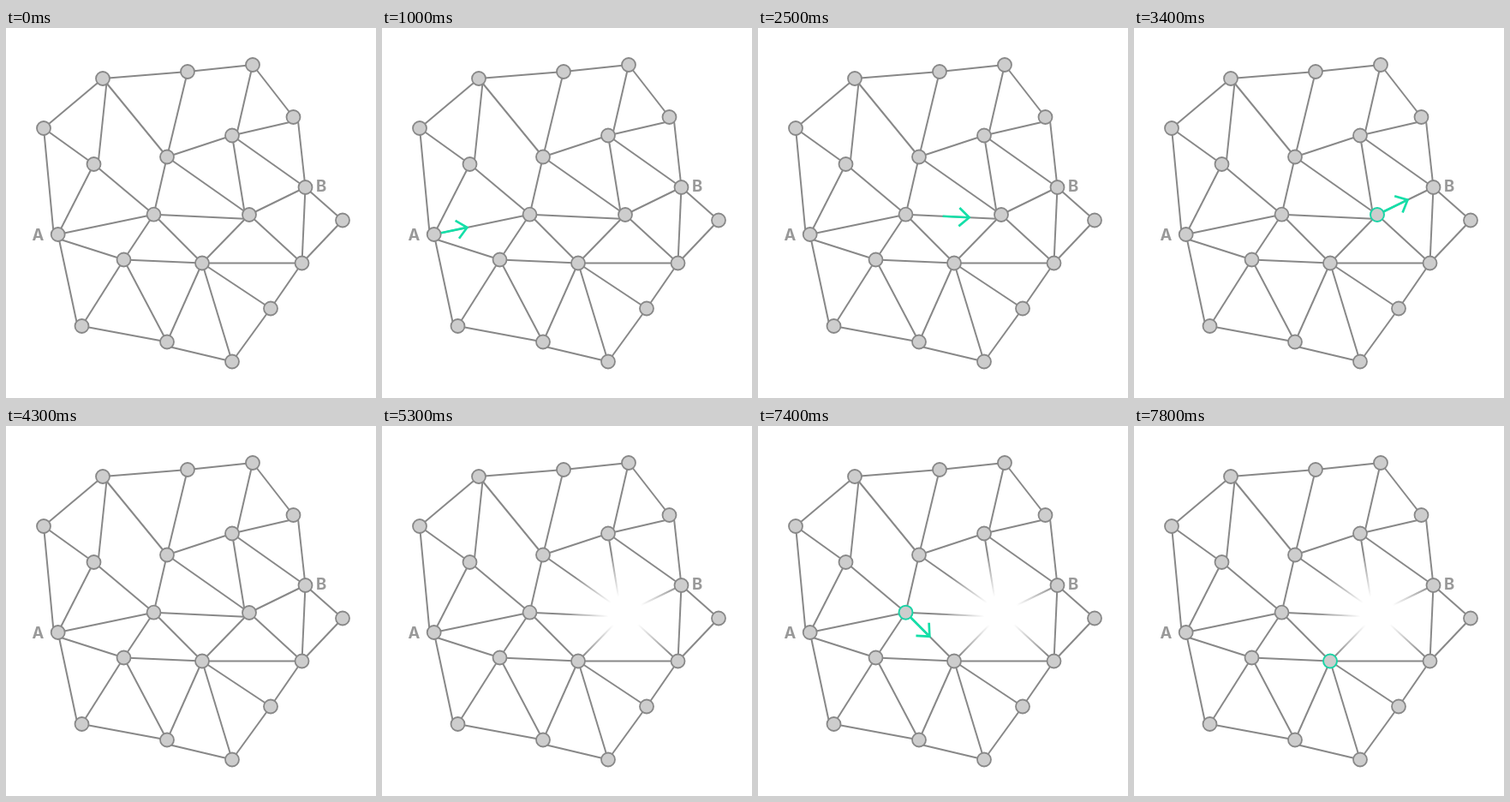
Write an HTML page with a canvas that moves like this. It is 432x432 px and loops after 8000 ms.

```html
<!DOCTYPE html>
<html lang="en">
<head>
<meta charset="utf-8">
<title>Network route</title>
<style>
html, body { margin: 0; width: 100%; height: 100%; overflow: hidden; background: #fff; }
canvas { display: block; width: 432px; height: 432px; }
</style>
</head>
<body>
<canvas id="stage"></canvas>
<script>
const LOOP = 8000, LOST_AT = 5300, LOST = 12;
const HOLD = 500, STEP = 200;
const GREY = '#888', FILL = '#cdcdcd', GREEN = '#14dfa8', RING = '#1dd3a6';

const nodes = `44,117 113,59 212,51 288,43 335.5,104 102.5,159 188,150.5 264,125.5 349.5,186
  393,224.5 60.7,241 172.5,217.7 284,218 137.5,270.5 229,274.5 345.5,274.5 309,327.5
  88.5,348 188,366.5 264,389.5`.split(/\s+/).map(p => p.split(',').map(Number));

// A letter after a node number attaches the line off centre: left, right or down
const sides = { '': [0, 0], l: [-5, 0], r: [5, 0], d: [0, 5] };
const edges = `0-1 1-2 2-3 3-4 4r-8 8-9 9-15 8-15 15-16 16-19 18d-19 17-18 10-17l 0-10l 0-5
  1r-5r 5-10 5-11 1-6 2-6 6-11 6-7 3-7r 4d-7 7-8 7-12l 6-12 10-11 11-12d 12-8 12-14 12-15
  11-13 11-14 10d-13 13-14 14-15 13-17 13-18 14-18 14-19 14-16`.split(/\s+/).map(readEdge);

// Each hop lights a node, then an arrow walks to the next one
const hops = [
  { at: 500, from: 10, to: 11, arrows: 4 },
  { at: 1800, from: 11, to: 12, arrows: 3, glow: true },
  { at: 2900, from: 12, to: 8, arrows: 2, glow: true },
  { at: 3800, from: 8, arrows: 0 },
  { at: 5800, from: 10, to: 11, arrows: 3, glow: true },
  { at: 6900, from: 11, to: 14, arrows: 2, glow: true },
  { at: 7800, from: 14, arrows: 0 }
];

const canvas = document.getElementById('stage');
const ctx = canvas.getContext('2d');
const scale = window.devicePixelRatio || 1;
canvas.width = canvas.height = 432 * scale;
ctx.scale(scale, scale);

const fade = ctx.createRadialGradient(...nodes[LOST], 20, ...nodes[LOST], 72);
fade.addColorStop(0, 'rgba(136,136,136,0)');
fade.addColorStop(1, 'rgba(136,136,136,1)');

function readEdge(text) {
  const [a, b] = text.split('-').map(end => {
    const id = parseInt(end), [dx, dy] = sides[end.replace(/\d+/, '')];
    return { id, point: [nodes[id][0] + dx, nodes[id][1] + dy] };
  });
  return { a: a.id, b: b.id, line: [a.point, b.point] };
}

function stroke(points, color, width) {
  ctx.beginPath();
  points.forEach(p => ctx.lineTo(...p));
  ctx.strokeStyle = color;
  ctx.lineWidth = width;
  ctx.stroke();
}

function drawNode([x, y], lit) {
  ctx.beginPath();
  ctx.arc(x, y, 8, 0, Math.PI * 2);
  ctx.fillStyle = FILL;
  ctx.fill();
  ctx.strokeStyle = lit ? RING : GREY;
  ctx.lineWidth = lit ? 2 : 1.8;
  ctx.stroke();
}

// The tip eases from just outside one node to the rim of the next
function drawArrow({ from, to, arrows }, index) {
  const [[x1, y1], [x2, y2]] = edges.find(e => e.a === from && e.b === to).line;
  const u = index / (arrows - 1);
  const first = 39.5, last = Math.hypot(x2 - x1, y2 - y1) - 9;
  ctx.save();
  ctx.translate(x1, y1);
  ctx.rotate(Math.atan2(y2 - y1, x2 - x1));
  ctx.translate(first + (last - first) * u * (1.2 - 0.2 * u), 0);
  stroke([[-31, 0], [0, 0]], GREEN, 2.7);
  stroke([[-11.8, -10.7], [0, 0], [-11.8, 10.7]], GREEN, 2.7);
  ctx.restore();
}

function draw(t) {
  const lost = t >= LOST_AT;
  const hop = hops.filter(h => h.at <= t).pop();
  const index = hop ? Math.floor((t - hop.at - HOLD) / STEP) : -1;
  const moving = hop && index >= 0 && index < hop.arrows;
  const lit = hop && (t < hop.at + HOLD || (hop.glow && index === 0)) ? hop.from : -1;

  ctx.fillStyle = '#fff';
  ctx.fillRect(0, 0, 432, 432);
  edges.forEach(({ a, b, line }) => {
    const cut = lost && (a === LOST || b === LOST);
    stroke(line, cut ? fade : GREY, 2);
  });
  nodes.forEach((n, i) => { if (!lost || i !== LOST) drawNode(n, i === lit); });
  if (moving) drawArrow(hop, index);

  ctx.font = '700 18.5px Inter, sans-serif';
  ctx.textAlign = 'center';
  ctx.fillStyle = '#999';
  ctx.fillText('A', 37.3, 248.2);
  ctx.fillText('B', 368, 190.8);
}

const start = performance.now();
function tick() {
  draw((performance.now() - start) % LOOP);
  requestAnimationFrame(tick);
}
tick();
</script>
</body>
</html>
```
